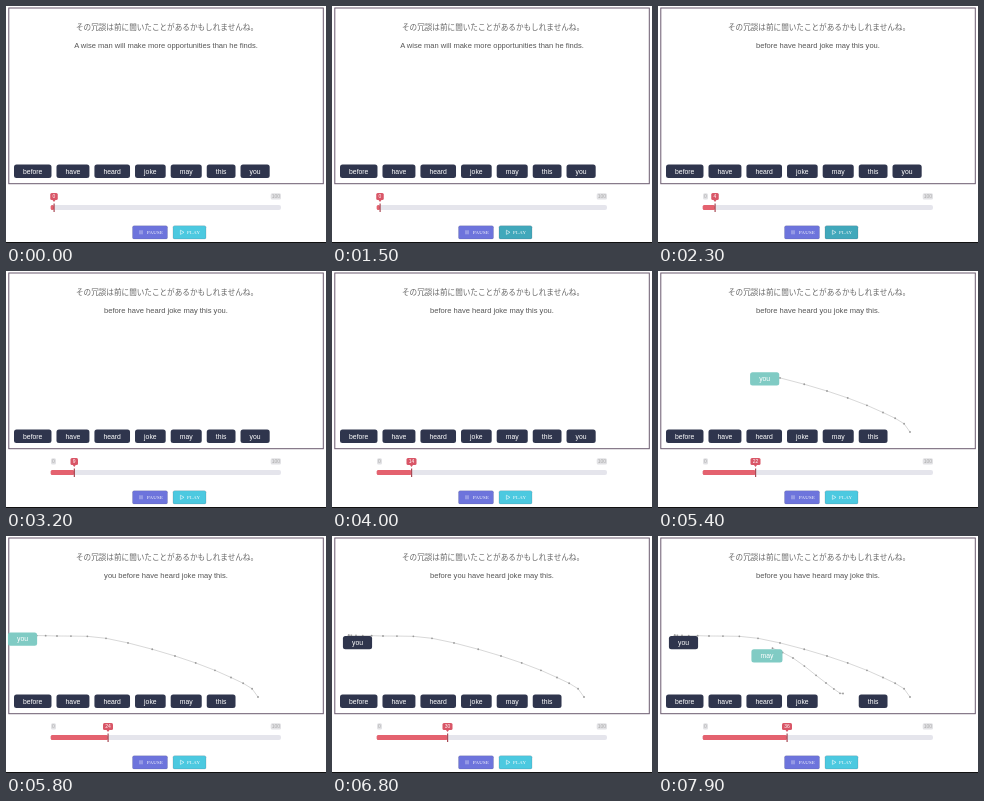
These frames come from a looping animation (320 by 237 pixels, 8 s). An HTML page:

```html
<!DOCTYPE html>
<html lang="en">
<head>
<meta charset="utf-8">
<title>Word ordering replay</title>
<style>
html, body { margin: 0; width: 100%; height: 100%; overflow: hidden; background: #fff; }
svg { display: block; width: 320px; height: 237px; font-family: "Liberation Sans", Arial, sans-serif; }
text { text-anchor: middle; }
.ja { font-family: "Noto Sans CJK JP", "Noto Sans CJK", sans-serif; }
.caps { font: 4.8px "Liberation Serif", Times, serif; letter-spacing: .3px; }
.caps text { text-anchor: start; }
</style>
</head>
<body>
<svg id="stage" viewBox="0 0 320 237"></svg>
<script>
const LOOP = 8000;
const WORD_SIZE = 6.8, PADDING = 18.2, GAP = 5, WORD_Y = 158.6, WORD_H = 13.3;
const KEY_STEPS = 3;   // pointer samples between two key points
const stage = document.getElementById('stage');

const clamp = (v, lo, hi) => Math.min(hi, Math.max(lo, v));
const rect = (x, y, w, h, fill, r = 0, more = '') =>
  `<rect x="${x}" y="${y}" width="${w}" height="${h}" rx="${r}" fill="${fill}" ${more}/>`;
const text = (s, x, y, size, fill, more = '') =>
  `<text x="${x}" y="${y}" font-size="${size}" fill="${fill}" ${more}>${s}</text>`;

function layOut(list) {
  const pen = document.createElement('canvas').getContext('2d');
  pen.font = '100px "Liberation Sans", Arial, sans-serif';
  let next = 8;
  return list.map(word => {
    const x = next, w = pen.measureText(word).width * WORD_SIZE / 100 + PADDING;
    next += w + GAP;
    return { word, x, y: WORD_Y, w };
  });
}
const words = layOut(['before', 'have', 'heard', 'joke', 'may', 'this', 'you']);

// Pointer curves; the first and last point only shape the ends
const drags = {
  you: {
    grab: 4800, start: 4940, step: 54, drop: 6500, dx: 3, dy: -3.7,
    keys: [[252, 205], [252, 161], [225, 141.5], [169, 120], [100, 102.3], [51, 100],
      [24, 99.5], [16.5, 99.5], [28.5, 103], [28.5, 103]]
  },
  may: {
    grab: 7500, start: 7490, step: 51, drop: LOOP, dx: 5, dy: -8,
    keys: [[174, 131], [185, 157.5], [168, 147], [135, 122], [105, 108], [80, 95]]
  }
};

// Catmull-Rom curve through the key points
function curve(keys, sample) {
  const i = Math.min(Math.floor(sample / KEY_STEPS), keys.length - 4);
  const u = sample / KEY_STEPS - i;
  const [a, b, c, d] = keys.slice(i, i + 4);
  return [0, 1].map(k => b[k] + u / 2 * (c[k] - a[k] +
    u * (2 * a[k] - 5 * b[k] + 4 * c[k] - d[k] + u * (3 * (b[k] - c[k]) + d[k] - a[k]))));
}

function place(item, t) {
  const d = drags[item.word];
  if (!d || t < d.grab) return item;
  const now = clamp((t - d.start) / d.step, 0, (d.keys.length - 3) * KEY_STEPS);
  const point = curve(d.keys, now);
  const trail = Array.from({ length: Math.floor(now) + 1 }, (_, i) => curve(d.keys, i));
  return {
    ...item, held: t < d.drop, trail: [...trail, point],
    x: point[0] - d.dx - item.w / 2, y: point[1] - d.dy - WORD_H / 2
  };
}

const drawTrail = points =>
  `<polyline points="${points.join(' ')}" fill="none" stroke="#c8c8c8" stroke-width=".7"/>` +
  points.slice(0, -1).map(([x, y]) => `<circle cx="${x}" cy="${y}" r=".9" fill="#999"/>`).join('');

const drawWord = ({ word, x, y, w, held }) =>
  rect(x, y, w, WORD_H, held ? '#80cbc4' : '#2f354d', 2.5) +
  text(word, x + w / 2, y + 9, WORD_SIZE, '#fff');

function drawSlider(value) {
  const x = 48 + 2.25 * value, w = value > 9 ? 10 : 7.5;
  const limit = (s, left, width) =>
    rect(left, 187.3, width, 6.2, '#e2e2e5', 1.5) + text(s, left + width / 2, 192.2, 5, '#aaa');
  return rect(44.7, 199, 230.3, 5, '#e5e5ec', 2) +
    rect(44.7, 199, x - 44.7, 5, '#e4626f', 1.5) +
    rect(x - .5, 197.5, 1.2, 8.5, '#a84a56') +
    (value > 3 ? limit(0, 45, 5) : '') + limit(100, 264.7, 10.3) +
    rect(x - w / 2, 187, w, 7, '#d95667', 1.5) +
    `<path d="M${x - 1.5} 194h3l-1.5 2z" fill="#d95667"/>` +
    text(value, x, 192.3, 5, '#fff');
}

function drawControls(t) {
  const hover = clamp((t - 900) / 100, 0, 1) * clamp((2700 - t) / 200, 0, 1);
  const mix = (a, b) => Math.round(a + (b - a) * hover);
  const cyan = `rgb(${mix(76, 65)},${mix(201, 168)},${mix(224, 187)})`;
  const edge = 'stroke="#556" stroke-opacity=".35" stroke-width=".5"';
  return '<g class="caps" fill="#fff">' +
    rect(126.5, 219.7, 35, 13.2, '#6d74dc', 1.5, edge) +
    rect(167, 219.7, 33, 13.2, cyan, 1.5, edge) +
    '<path d="M134 224.3v4M136 224.3v4M174.4 224.2l3.6 2.1-3.6 2.1z" fill="none" stroke="#fff" stroke-width=".55"/>' +
    '<text x="141" y="228">PAUSE</text><text x="181" y="228">PLAY</text></g>';
}

function draw(t) {
  const items = words.map(w => place(w, t));
  const order = [...items].sort((a, b) => a.x - b.x).map(i => i.word).join(' ');
  const sentence = t < 1800 ? 'A wise man will make more opportunities than he finds.' : order + '.';
  const value = Math.max(0, Math.floor((t - 1600) / 171));
  stage.innerHTML =
    rect(2.8, 2, 314.5, 175.7, '#fff', 0, 'stroke="#6b5a6f" stroke-width="1"') +
    text('その冗談は前に聞いたことがあるかもしれませんね。', 161, 23.6, 7.6, '#666', 'class="ja"') +
    text(sentence, 160, 41.8, 7.56, '#555') +
    items.filter(i => i.trail).map(i => drawTrail(i.trail)).join('') +
    items.map(drawWord).join('') +
    drawSlider(value) + drawControls(t) +
    rect(0, 236, 320, 1, '#111');
}

const begin = performance.now();
function frame() {
  draw((performance.now() - begin) % LOOP);
  requestAnimationFrame(frame);
}
frame();
</script>
</body>
</html>
```
